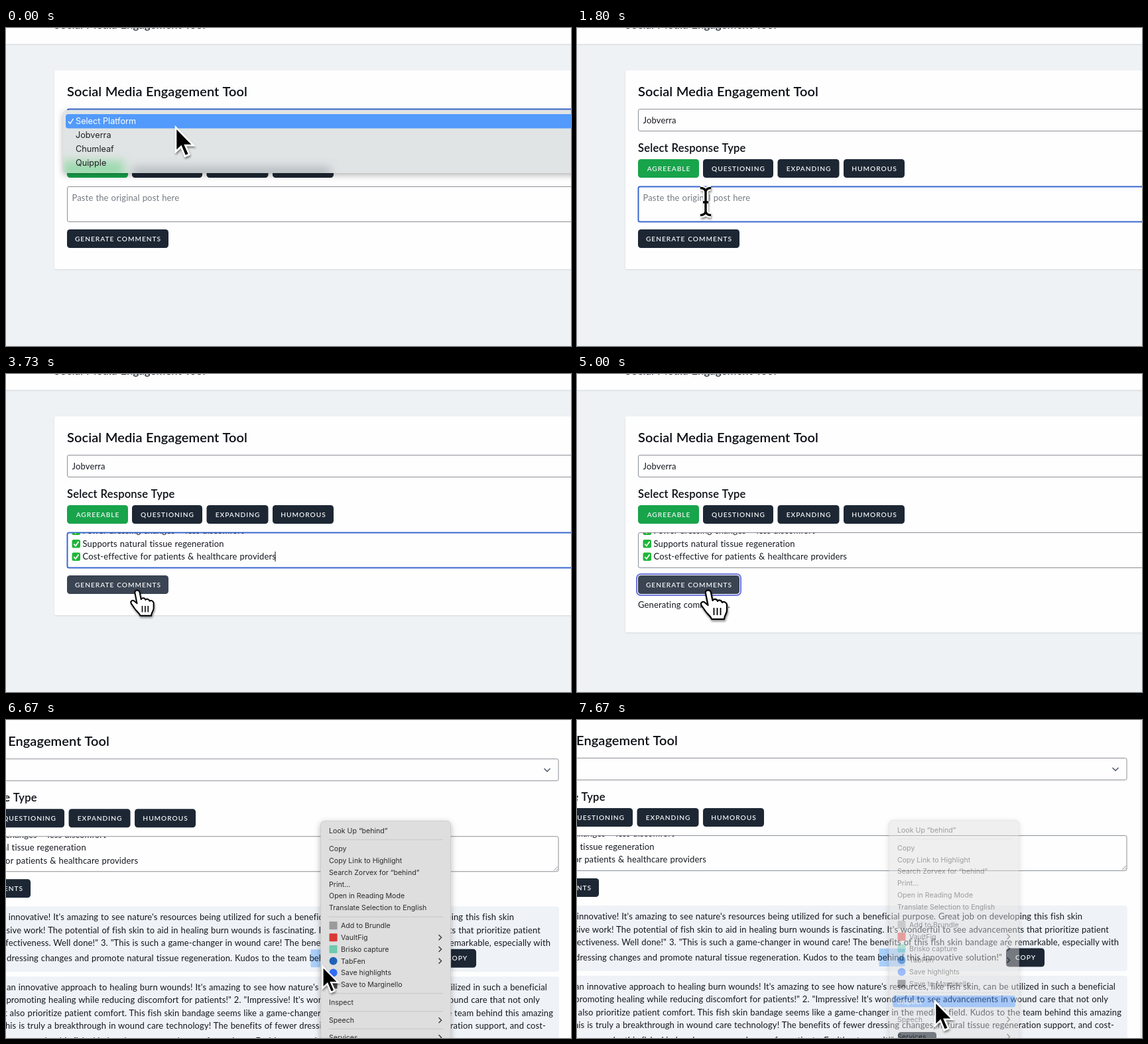
An HTML page for the animation above (7740 ms loop, 852 px wide and 480 px high).

```html
<!DOCTYPE html>
<html lang="en">
<head>
<meta charset="utf-8">
<title>Engagement tool demo</title>
<style>
  html, body { margin: 0; width: 100%; height: 100%; overflow: hidden; background: #eef2f5; }
  svg { display: block; width: 100vw; height: 100vh; }
  text { white-space: pre; }
  .page { font: 13px Lato, "Open Sans", sans-serif; letter-spacing: .15px; word-spacing: .5px; fill: #14181f; }
  .title { font-size: 20px; font-weight: 600; letter-spacing: .08px; fill: #0b0e14; }
  .label { font-size: 16.6px; font-weight: 600; letter-spacing: .18px; fill: #0b0e14; }
  .crumb { font-size: 16.7px; font-weight: 600; letter-spacing: .1px; fill: #2b3440; }
  .hint { fill: #757b84; }
  .btn { font-size: 10.2px; font-weight: 600; letter-spacing: .95px; text-anchor: middle; fill: #f3f5f7; }
  .end { text-anchor: end; letter-spacing: .11px; word-spacing: .45px; }
  .mac { font: 12.7px Inter, sans-serif; fill: #1f2123; }
  .ctx { font: 10.6px Inter, sans-serif; fill: #2c2c2c; }
</style>
</head>
<body>
<svg id="stage" viewBox="0 0 852 480" preserveAspectRatio="none"></svg>
<script>
const LOOP = 7740;
const FOCUS_POST = 1540, PASTE = 2500, GENERATE = 3870, PAN = 5690, RESULTS = 6300, MENU = 6570, MENU_CLOSE = 7600;
const NAVY = '#1d2734', SLATE = '#3a4452';

const esc = s => s.replace(/&/g, '&amp;');
const text = (x, y, s, cls = 'page', more = '') => `<text x="${x}" y="${y}" class="${cls}" ${more}>${esc(s)}</text>`;
const rect = (x, y, w, h, fill, r = 0, more = '') =>
  `<rect x="${x}" y="${y}" width="${w}" height="${h}" rx="${r}" fill="${fill}" ${more}/>`;
const line = (d, color, w = 1, more = '') => `<path d="${d}" fill="none" stroke="${color}" stroke-width="${w}" ${more}/>`;
const group = (id, body, more = '') => `<g id="${id}" ${more}>${body}</g>`;
const button = (x, y, w, label, fill = NAVY, id = '') =>
  rect(x, y, w, 28, fill, 4.5, id && `id="${id}"`) + text(x + w / 2 + .5, y + 17.6, label, 'page btn');
const field = (id, y, h) => rect(92.5, y, 948.5, h, '#fefefe', 2.5, `id="${id}" stroke="#8b8f96"`);
const tick = (x, y) => rect(x, y, 12.5, 12.5, '#1fb53a', 2.5) +
  line(`M${x + 2.8} ${y + 6.6}l2.6 3 4.6-6.6`, '#fff', 1.8);

const pasted = ['Fewer dressing changes = less discomfort', 'Supports natural tissue regeneration',
  'Cost-effective for patients & healthcare providers']
  .map((s, i) => tick(99.5, 230.4 + i * 19.5) + text(115.5, 241.4 + i * 19.5, s)).join('');

// Each row: right edge, baseline, words.
const replies = [
  [974, 366, `1. "This is truly innovative! It's amazing to see nature's resources being utilized for such a beneficial purpose. Great job on developing this fish skin`],
  [1014, 385.5, `bandage!" 2. "Impressive work! The potential of fish skin to aid in healing burn wounds is fascinating. It's wonderful to see advancements that prioritize patient`],
  [1029, 405, `comfort and effectiveness. Well done!" 3. "This is such a game-changer in wound care! The benefits of this fish skin bandage are remarkable, especially with`],
  [853, 427.5, `its ability to reduce dressing changes and promote natural tissue regeneration. Kudos to the team behind this innovative solution!"`],
  [1024, 472, `1. "This is such an innovative approach to healing burn wounds! It's amazing to see how nature's resources, like fish skin, can be utilized in such a beneficial`],
  [1013, 491, `way. The focus on promoting healing while reducing discomfort for patients!" 2. "Impressive! It's wonderful to see advancements in wound care that not only`],
  [1033, 510.5, `heal but also prioritize patient comfort. This fish skin bandage seems like a game-changer in the medical field. Kudos to the team behind this amazing`],
  [1022, 530, `product!" 3. "This is truly a breakthrough in wound care technology! The benefits of fewer dressing changes, natural tissue regeneration support, and cost-`],
  [690, 552.5, `effectiveness make this fish skin bandage a game-changer for patients. Exciting to see it!"`]
].map(([x, y, s]) => text(x, y, s, 'page end')).join('');

const results = rect(92, 345, 950, 99, '#eff3f7', 4) + rect(92, 451, 950, 124, '#eff3f7', 4) +
  rect(667.5, 410, 39, 27, '#a9cffb', 0, 'id="marked"') + replies +
  button(859, 409.5, 58, 'COPY') + button(696, 536, 58, 'COPY');

const platforms = ['Select Platform', 'Jobverra', 'Chumleaf', 'Quipple'];
const dropdown = `<g filter="url(#shadow)">${rect(86, 124, 1000, 95, '#e0e4e4', 5)}</g>
  <g clip-path="url(#dropClip)"><g filter="url(#smear)">${rect(86, 200, 92, 26, '#5fd07c', 0, 'opacity=".5"')}${rect(190, 209, 300, 20, '#5c6672', 0, 'opacity=".3"')}</g></g>` +
  rect(90, 130, 990, 21.5, '#529afb', 4, 'id="dropHover"') +
  platforms.map((s, i) => text(105, 144.8 + i * 21, s, 'mac', `id="option${i}"`)).join('') +
  line('M94 141l2.8 3.4 4.6-7.4', '#fff', 1.4, 'id="dropTick"');

// Menu rows: label, centre, optional icon colour and corner radius, optional arrow.
const menuRows = [
  ['Look Up “behind”', 231], ['Copy', 258], ['Copy Link to Highlight', 275.7], ['Search Zorvex for “behind”', 293.5],
  ['Print...', 311.5], ['Open in Reading Mode', 329.3], ['Translate Selection to English', 347],
  ['Add to Brundle', 374, '#9a9a9a', 1], ['VaultFig', 392, '#d83a35', 1, true],
  ['Brisko capture', 409.7, '#6fc9ae', 1, true], ['TabFen', 427.5, '#1f62b5', 6, true],
  ['Save highlights', 445.3, '#2f6df5', 6], ['Save to Marginello', 463.3, '#444', 1],
  ['Inspect', 490], ['Speech', 517, , , true], ['Services', 543, , , true]
];
const menu = `<g filter="url(#shadow)">${rect(682.5, 216, 196, 350, '#dedede', 6, 'stroke="#c4c4c4" stroke-width=".7"')}</g>` +
  rect(688, 0, 185, 17.5, '#4f93f7', 3.5, 'id="menuHover"') +
  [244.5, 361, 476.5, 503.5, 530].map(y => line(`M694.5 ${y}H867`, '#c6c6c6')).join('') +
  menuRows.map(([s, y, icon, r, arrow], i) =>
    (icon ? rect(695.5, y - 6, 12, 12, icon, r) : '') +
    text(icon ? 713 : 695, y + 3.8, s, 'ctx', `id="row${i}"`) +
    (arrow ? line(`M860.5 ${y - 4}l4 4-4 4`, '#3a3a3a', 1.4) : '')).join('');

const pointers =
  group('arrow', '<path d="M1 2V38.5L9 31 15 45.5 21.3 42.8 15.2 29H27.5Z" fill="#000" stroke="#fff" stroke-width="2.6"/>') +
  group('hand', '<path d="M-4 4C-5-2 3-2 4 3L6.5 15C8 12 13 12 14 16 15 13.5 20 14 21 18 22.5 16 27 17 28 21V30C28 35 24 37 24 43H5C4 39-2 35-5 30L-10.5 22C-12.5 18-8 15-4.5 18.5L-.5 22Z" fill="#fff" stroke="#000" stroke-width="2.2" stroke-linejoin="round"/>' +
    line('M8.5 26V37M13.5 26V37M18.5 26V37', '#000', 1.8)) +
  group('beam', ['#fff', '#000'].map((c, i) =>
    line('M-8-20.5Q-1-20.5 0-15 1-20.5 8-20.5M0-15V15M-8 20.5Q-1 20.5 0 15 1 20.5 8 20.5M-4 1H4', c, i ? 3.4 : 7.5)).join(''));

const stage = document.getElementById('stage');
stage.innerHTML = `<defs>
  <filter id="shadow" x="-10%" y="-20%" width="120%" height="150%"><feDropShadow dx="0" dy="3" stdDeviation="5" flood-opacity=".3"/></filter>
  <filter id="soft" x="-50%" y="-50%" width="200%" height="200%"><feDropShadow dx="1" dy="2.5" stdDeviation="1.8" flood-opacity=".45"/></filter>
  <filter id="cardShade" x="-5%" y="-5%" width="110%" height="110%"><feDropShadow dx="0" dy="1" stdDeviation="1.2" flood-opacity=".1"/></filter>
  <filter id="smear" x="-20%" y="-80%" width="140%" height="260%"><feGaussianBlur stdDeviation="7"/></filter>
  <filter id="motion" filterUnits="userSpaceOnUse" x="-20" y="-20" width="1120" height="640"><feGaussianBlur id="blur"/></filter>
  <clipPath id="postClip"><rect x="93" y="240" width="947" height="52"/></clipPath>
  <clipPath id="dropClip"><rect x="86" y="124" width="1000" height="95" rx="5"/></clipPath>
</defs>` + rect(0, 0, 852, 480, '#eef2f5') + group('world',
  `<g filter="url(#cardShade)">${rect(-20, -40, 1120, 64, '#fefefe')}${rect(73, 64, 988, 300, '#fefefe', 3, 'id="card"')}</g>` +
  text(72.5, 1, 'Social Media Engagement Tool', 'page crumb') +
  text(92, 103, 'Social Media Engagement Tool', 'page title') +
  field('select', 122.5, 33) + text(99.5, 143.7, '', 'page', 'id="choice"') +
  line('M1019.5 137l4.5 4.5 4.5-4.5', '#4b5563', 1.5) +
  text(92, 186.5, 'Select Response Type', 'page label') +
  button(92, 198, 92, 'AGREEABLE', '#18a44b') + button(190, 198, 106, 'QUESTIONING') +
  button(302.5, 198, 93, 'EXPANDING') + button(402, 198, 92, 'HUMOROUS') +
  field('post', 239.5, 53) + line('M1034 291l6-6M1037.5 291l2.5-2.5', '#777', .8) +
  text(99.5, 260.7, 'Paste the original post here', 'page hint', 'id="hint"') +
  group('pasted', pasted, 'clip-path="url(#postClip)"') +
  line('M406 268V283', '#111', 1, 'id="caret"') +
  rect(90, 302, 157, 32, '#fff', 6, 'id="ring" stroke="#6d74dc" stroke-width="2"') +
  button(92, 304, 153, 'GENERATE COMMENTS', NAVY, 'generate') +
  text(92, 353, 'Generating comments...', 'page', 'id="status"') +
  group('results', results) + group('dropdown', dropdown) + group('menu', menu) +
  group('pointer', pointers, 'filter="url(#soft)"'));

const el = Object.fromEntries([...stage.querySelectorAll('[id]')].map(n => [n.id, n]));
const set = (id, name, value) => el[id].setAttribute(name, value);
const show = (id, on) => set(id, 'visibility', on ? 'visible' : 'hidden');
const clamp = p => Math.max(0, Math.min(1, p));
const smooth = p => p * p * (3 - 2 * p);

// Pointer stops in page coordinates: time, x, y, easing into the stop.
const stops = [
  [0, 255, 148], [100, 255, 148], [450, 240, 162], [850, 240, 162], [1500, 194, 262], [2600, 194, 262],
  [3200, 198, 327], [5700, 198, 327], [6130, 571, 447.5, p => p ** 1.6],
  [6500, 684.5, 434, p => 1 - (1 - p) ** 4], [6750, 684.5, 434], [7400, 751, 488], [LOOP, 751, 488]
];
function pointerAt(t) {
  const i = Math.max(1, stops.findIndex(s => s[0] > t));
  const [t0, x0, y0] = stops[i - 1], [t1, x1, y1, ease = smooth] = stops[i];
  const p = ease((t - t0) / (t1 - t0));
  return [x0 + (x1 - x0) * p, y0 + (y1 - y0) * p];
}
function pointerKind(y, t) {
  if (t < 750 || t >= RESULTS) return 'arrow';
  if (t >= PAN) return 'hand';
  if (y > 239 && y < 293) return 'beam';
  return (y > 198 && y < 226) || y > 304 ? 'hand' : 'arrow';
}
const clicks = [510, 1540, 3730, 6640, 7530];
const pressScale = t => 1 - .12 * clicks.reduce((sum, c) => sum + Math.exp(-(((t - c) / 90) ** 2)), 0);

function focusField(id, on) {
  set(id, 'stroke', on ? '#3b69d0' : '#8b8f96');
  set(id, 'stroke-width', on ? 2 : 1);
}

function draw(t) {
  const s = Math.max(0, t - PAN) / 1000, w = 6, decay = Math.exp(-w * s);
  const pan = 1 - (1 + w * s) * decay, speed = 212 * w * w * s * decay;
  set('world', 'transform', `translate(${-212 * pan} ${-65 * pan})`);
  const blur = speed * .0038;
  if (blur > .15) {
    set('world', 'filter', 'url(#motion)');
    set('blur', 'stdDeviation', `${blur} ${blur * .7}`);
  } else el.world.removeAttribute('filter');

  const [x, y] = pointerAt(t), kind = pointerKind(y, t);
  set('pointer', 'transform', `translate(${x} ${y}) scale(${pressScale(t)})`);
  ['arrow', 'hand', 'beam'].forEach(k => show(k, k === kind));

  const open = 1 - clamp((t - 600) / 150), hovered = y < 151 ? 0 : 1;
  set('dropdown', 'opacity', open);
  set('dropHover', 'y', 130 + hovered * 21);
  platforms.forEach((_, i) => { el['option' + i].style.fill = i === hovered ? '#fff' : ''; });
  set('dropTick', 'stroke', hovered ? '#222' : '#fff');
  el.choice.textContent = platforms[t < 600 ? 0 : 1];

  const busy = t >= GENERATE && t < RESULTS;
  focusField('select', t < FOCUS_POST);
  focusField('post', t >= FOCUS_POST && t < GENERATE);
  show('hint', t < PASTE);
  show('pasted', t >= PASTE);
  show('caret', t >= PASTE && t < GENERATE);
  show('ring', busy);
  show('status', busy);
  set('generate', 'fill', t > 3100 && t < RESULTS ? SLATE : NAVY);
  set('card', 'height', t < GENERATE ? 300 : busy ? 326 : 540);
  show('results', t >= RESULTS);
  show('marked', t >= MENU);

  set('menu', 'opacity', t < MENU ? 0 : 1 - clamp((t - MENU_CLOSE) / 130));
  const row = t < 6800 || x < 688 ? -1 : menuRows.findIndex(r => Math.abs(r[1] - y) < 8.8);
  show('menuHover', row >= 0);
  if (row >= 0) set('menuHover', 'y', menuRows[row][1] - 9);
  menuRows.forEach((_, i) => { el['row' + i].style.fill = i === row ? '#fff' : ''; });
}

const start = performance.now();
function tickFrame() {
  draw((performance.now() - start) % LOOP);
  requestAnimationFrame(tickFrame);
}
draw(0);
requestAnimationFrame(tickFrame);
</script>
</body>
</html>
```
